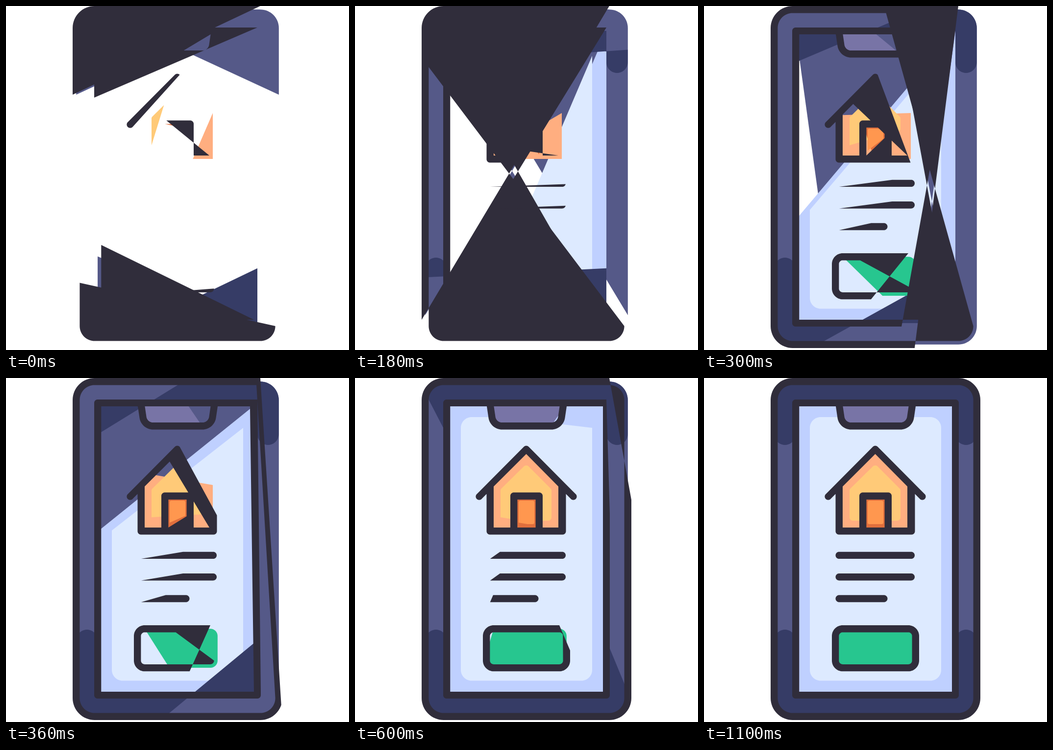
These frames come from a looping animation (700x704 px, 1600 ms). An HTML page with a canvas:

```html
<!DOCTYPE html>
<html lang="en">
<head>
<meta charset="utf-8">
<title>House listing on a phone</title>
<style>
  html, body { margin: 0; width: 100%; height: 100%; overflow: hidden; background: #fff; }
  canvas { display: block; width: 100vw; height: 100vh; }
</style>
</head>
<body>
<canvas id="stage" width="700" height="704"></canvas>
<script>
const ctx = document.getElementById('stage').getContext('2d');
const LOOP = 1600, STEP = 20, DONE = 1100;
const INK = '#302d3b', BODY = '#555988', NAVY = '#363c66';
const W = 14.4, HALF = W / 2; // line weight

// Share of each outline drawn; the loop joins an eased sweep already under way
function progress(ms) {
  return ms >= DONE ? 1 : ease(0.2828 + Math.max(ms, 18) / 1550);
}

// cubic-bezier(.4, 0, .38, 1)
function ease(x) {
  const mix = (a, b, s) => 3 * a * s * (1 - s) ** 2 + 3 * b * s * s * (1 - s) + s ** 3;
  let lo = 0, hi = 1;
  for (let i = 0; i < 30; i++) {
    const s = (lo + hi) / 2;
    if (mix(0.4, 0.38, s) < x) lo = s; else hi = s;
  }
  return mix(0, 1, lo);
}

const dist = (a, b) => Math.hypot(b[0] - a[0], b[1] - a[1]);
const mirror = (pts, axis) => pts.map(([x, y, r]) => [2 * axis - x, y, r]).reverse();

// Points around one rounded corner
function corner(prev, p, next) {
  const r = p[2];
  if (!r) return [[p[0], p[1]]];
  const toward = q => [(q[0] - p[0]) / dist(p, q), (q[1] - p[1]) / dist(p, q)];
  const u = toward(prev), v = toward(next);
  const half = Math.acos(u[0] * v[0] + u[1] * v[1]) / 2;
  const d = r / Math.tan(half);
  const mx = u[0] + v[0], my = u[1] + v[1], k = r / Math.sin(half) / Math.hypot(mx, my);
  const cx = p[0] + mx * k, cy = p[1] + my * k;
  const from = Math.atan2(p[1] + u[1] * d - cy, p[0] + u[0] * d - cx);
  const to = Math.atan2(p[1] + v[1] * d - cy, p[0] + v[0] * d - cx);
  const turn = Math.atan2(Math.sin(to - from), Math.cos(to - from));
  return Array.from({ length: 17 }, (_, i) => {
    const a = from + turn * i / 16;
    return [cx + r * Math.cos(a), cy + r * Math.sin(a)];
  });
}

// Closed outline through [x, y, radius] points, with its length
function outline(...pts) {
  const n = pts.length;
  const line = pts.flatMap((p, i) => corner(pts[(i + n - 1) % n], p, pts[(i + 1) % n]));
  line.push(line[0]);
  const length = line.reduce((sum, p, i) => i ? sum + dist(line[i - 1], p) : 0, 0);
  return { line, length };
}

// Inset box drawn from just after the corner before `first`, or just before `first`
const TL = 0, TR = 1, BR = 2, BL = 3, CW = 1, CCW = 3;
function box([l, t, r, b, round], inset, turn, first, late) {
  const rad = Math.max(0, round - inset);
  const all = [[l, t], [r, t], [r, b], [l, b]].map(([x, y], i) =>
    [x + (i % 3 ? -inset : inset), y + (i < 2 ? inset : -inset), rad]);
  const order = all.map((_, i) => all[(first + i * turn) % 4]);
  const a = order[3], z = order[0], len = dist(a, z);
  const k = (late ? len - rad : rad) / len;
  return outline([a[0] + (z[0] - a[0]) * k, a[1] + (z[1] - a[1]) * k], ...order);
}

const phone = [136, 0, 564, 700, 45];
const frame = [180, 44, 520, 656, 7];
const page = [216, 80, 484, 619.5, 22];
const door = [317, 234.3, 383, 320.5, 7];
const pane = [334, 251, 366, 299, 3];
const button = [261, 506, 439, 600.3, 22];

// Shaded end of the case; `tip` is how far its rounded sides reach
function shade(tip, flip) {
  const out = 143.4, inn = 187, r = (inn - out) / 2;
  const side = [[inn, 51], [inn, tip, r], [out, tip, r], [out, HALF, 45 - HALF]];
  const pts = [[inn, tip - r], side[0], ...mirror(side, 350).reverse(),
    side[3], side[2], side[1]];
  return outline(...pts.map(([x, y, c]) => flip ? [700 - x, 700 - y, c] : [x, y, c]));
}

// Notch points from left top to right top
function notch(inset, top) {
  const left = [[269 + inset - (58 - top) * 0.15, top],
    [276 + inset * 0.85, 105.5 - inset, 28 - inset]];
  return [...left, ...mirror(left, 350.5)];
}
const notchMid = notch(HALF, 51);

const eave = [[243.5, 242.7, 7], [253.5, 252.5, 7], [268.5, 237.3], [268.5, 320.5, 7]];

const textLines = [430, 430, 374.5].map((right, i) => {
  const y = 355.7 + 44.3 * i;
  return [INK, box([268.5, y, right, y + W, HALF], 0, CCW, BR)];
});

const shapes = [
  // body, screen, page
  [BODY, box(phone, HALF, CW, TR)],
  ['#bfd0ff', box(frame, 7, CW, BR)],
  ['#ddeaff', box(page, 0, CW, BR)],
  // case
  [BODY, box(phone, HALF, CCW, TL), box(frame, 7, CW, BL)],
  [NAVY, shade(137, false)],
  [NAVY, shade(185, true)],
  ['#7874a6', outline([400, 98], notchMid[1], notchMid[0], notchMid[3], notchMid[2])],
  // house
  ['#ffae80', outline([422, 219], [422, 313], [275, 313], [275, 219], [349.5, 149])],
  ['#ffca78', outline([297, 285], [297, 228, 5], [349.5, 176, 7], [401, 228, 5],
    [401, 292, 7], [297, 292, 7])],
  ['#e06f3d', box(door, HALF, CW, TR)],
  ['#ff974f', box(pane, 0, CW, TL)],
  ['#27c68f', box(button, HALF, CW, TR)],
  // dark lines
  [INK, box(phone, 0, CCW, TL), box(phone, W, CW, BR, true)],
  [INK, box(frame, 0, CCW, TL),
    outline([506, 642], [194.3, 642], [194.3, 58], ...notch(0, 58), [506, 58]),
    outline(...notch(W, 58).reverse())],
  [INK,
    outline([354.5, 140.8], [349.5, 135.8, 7], ...eave, ...mirror(eave, 349.5)),
    outline([415, 306], [383, 306], [383, 234.3, 7], [317, 234.3, 7], [317, 306],
      [283, 306], [283, 222], [349.5, 155.5], [415, 222]),
    box(door, W, CW, TL)],
  ...textLines,
  [INK, box(button, 0, CCW, TL), box(button, W, CW, BR, true)]
];

function trace({ line, length }, share) {
  let left = length * share;
  ctx.moveTo(...line[0]);
  for (let i = 1; i < line.length && left > 0; i++) {
    const a = line[i - 1], b = line[i], d = dist(a, b);
    const k = d > left ? left / d : 1;
    ctx.lineTo(a[0] + (b[0] - a[0]) * k, a[1] + (b[1] - a[1]) * k);
    left -= d;
  }
  ctx.closePath();
}

function draw(ms) {
  const share = progress(ms);
  ctx.clearRect(0, 0, 700, 704);
  for (const [color, ...parts] of shapes) {
    ctx.fillStyle = color;
    ctx.beginPath();
    parts.forEach(part => trace(part, share));
    ctx.fill();
  }
}

const begin = performance.now();
function tick() {
  const ms = (performance.now() - begin) % LOOP;
  draw(Math.floor(ms / STEP) * STEP);
  requestAnimationFrame(tick);
}
tick();
</script>
</body>
</html>
```
